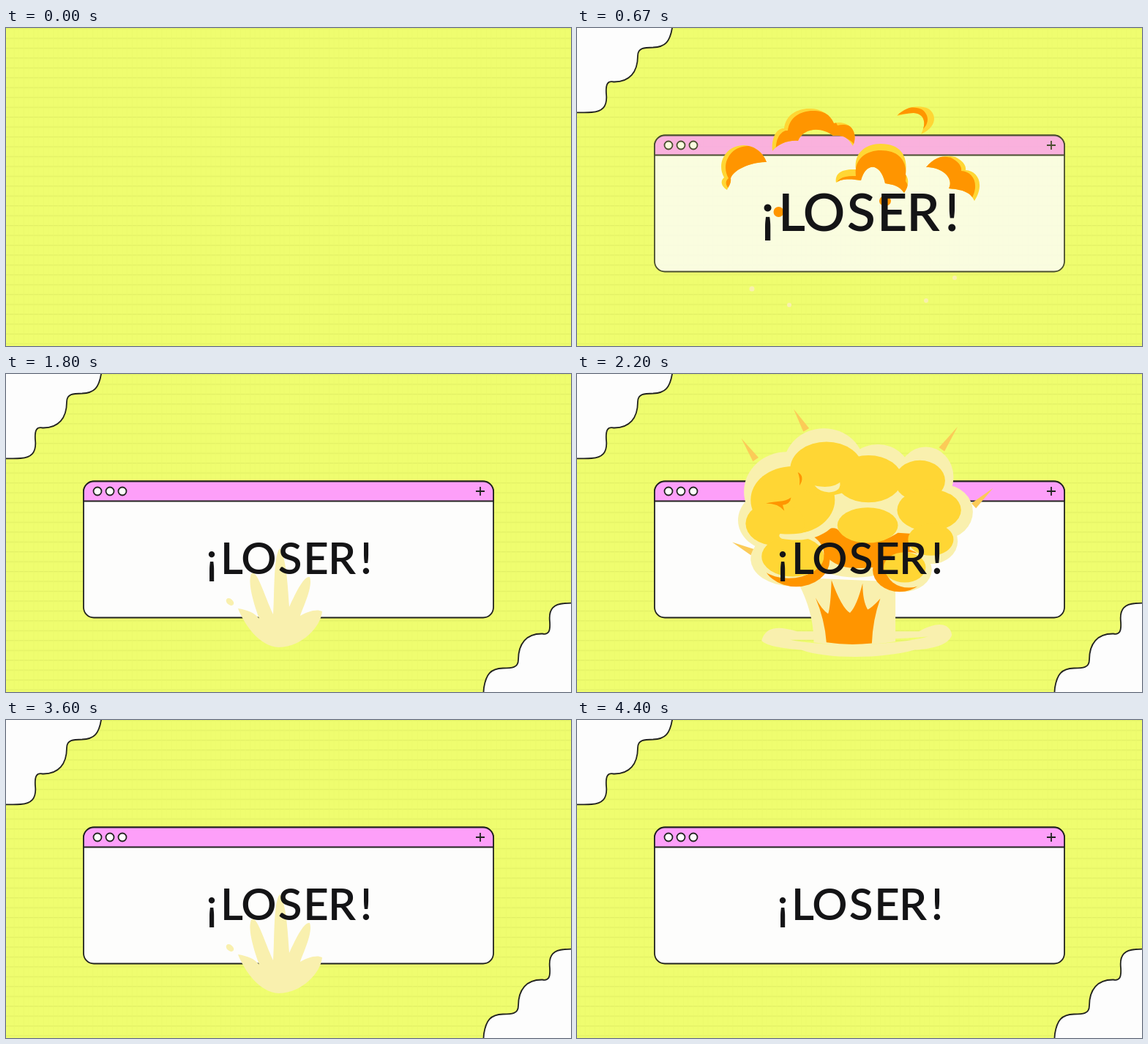
These frames come from a looping animation (772x434 px, 5410 ms). An HTML page:

```html
<!DOCTYPE html>
<html lang="es">
<head>
<meta charset="utf-8">
<title>¡LOSER!</title>
<style>
html, body { margin: 0; width: 100%; height: 100%; overflow: hidden; background: #effd6f; }
svg { display: block; width: 100%; height: 100%; }
.line { stroke: #222320; stroke-width: 1.8; }
.cream { fill: #f9f0ae; }
.yellow { fill: #ffd634; }
.orange { fill: #ff9500; }
.ray { fill: #fbcb58; }
.fat .puff { stroke: #ffd634; stroke-width: 9; stroke-linejoin: round; }
.tiny .puff { transform-box: fill-box; transform-origin: center; transform: scale(.42); }
text { font: 600 60px Lato, "Open Sans", sans-serif; text-anchor: middle; fill: #141416; }
</style>
</head>
<body>
<svg viewBox="0 0 772 434">
  <defs>
    <pattern id="paper" width="13.45" height="13.45" patternUnits="userSpaceOnUse">
      <rect width="14" height="14" fill="#effd6f"/>
      <path d="M0 .7H14" stroke="#dfed63" stroke-width="1"/>
      <path d="M4 0V14M11 0V14" stroke="#ebf96a" stroke-width=".6"/>
    </pattern>
    <path id="corner" d="M-14 -12H131L130 0C127 18 121 26 104 26.500C92 26.500 83 27 83 38C83 60 72 74 50 73.500C42 72 39 76 40 90C42 108 34 114 20 115C12 116 6 115 -14 115.500Z"/>
    <path id="splash" d="M317 320C330 322 340 326 346 334C338 312 330 285 335 273C342 264 352 300 365 328C367 300 365 250 374 238C383 250 385 290 387 318C395 300 407 275 415 277C420 290 405 320 402 330C412 324 425 320 432 324C430 345 405 372 373 373C345 372 325 340 317 320Z"/>
    <g id="mushroom"></g>
    <g id="puffs"></g>
  </defs>

  <rect width="772" height="434" fill="url(#paper)"/>
  <use id="topLeft" href="#corner" class="line" fill="#fdfdfd"/>
  <use id="bottomRight" href="#corner" class="line" fill="#fdfdfd" transform="rotate(180 391.5 214)"/>

  <g id="window" class="line" fill="#fdfdfc">
    <rect x="106" y="146.500" width="560" height="186" rx="14"/>
    <path d="M106 173.500V160.500a14 14 0 0 1 14 -14H652a14 14 0 0 1 14 14V173.500Z" fill="#fd9ff9"/>
    <circle cx="125" cy="160" r="5.500"/>
    <circle cx="142" cy="160" r="5.500"/>
    <circle cx="159" cy="160" r="5.500"/>
    <path d="M642 160H654M648 154V166"/>
  </g>

  <g id="blast">
    <g>
      <use href="#splash" class="cream"/>
      <ellipse cx="306" cy="311" rx="6" ry="4" class="cream" transform="rotate(40 306 311)"/>
    </g>
    <g>
      <use href="#splash" class="cream" transform="translate(373 373) scale(1.4 1.9) translate(-373 -373)"/>
      <use href="#splash" class="yellow" transform="translate(373 372) scale(.95 1.3) translate(-373 -373)"/>
      <use href="#splash" class="orange" transform="translate(373 371) scale(.55 .8) translate(-373 -373)"/>
    </g>
    <g>
      <use href="#splash" class="cream" transform="translate(373 373) scale(2 2.440) translate(-373 -373)"/>
      <use href="#mushroom" transform="translate(373 372) scale(.8) translate(-373 -372)"/>
    </g>
    <use href="#mushroom"/>
    <use href="#mushroom" transform="translate(373 372) scale(1.15) translate(-373 -372)"/>
    <g class="fat"><use href="#puffs" transform="translate(375 200) scale(1.05 1.15) translate(-375 -215)"/></g>
    <use href="#puffs"/>
    <g id="remains" class="tiny"></g>
  </g>

  <g id="title"><text x="281 308.500 345.500 388 423.500 459 492" y="273">¡LOSER!</text></g>
</svg>

<script>
const LOOP = 5410, BLAST_CYCLE = 1800, BLAST_STEP = 100;
const $ = id => document.getElementById(id);

const ellipses = (cls, list) => list.map(([x, y, rx, ry = rx]) =>
  `<ellipse class="${cls}" cx="${x}" cy="${y}" rx="${rx}" ry="${ry}"/>`).join('');
const shape = (cls, d) => `<path class="${cls}" fill-rule="evenodd" d="${d}"/>`;

// Tapered spike from a tip to the middle of its base
function ray(tipX, tipY, x, y) {
  const len = Math.hypot(x - tipX, y - tipY);
  const nx = (tipY - y) / len * 4, ny = (x - tipX) / len * 4;
  return shape('ray', `M${tipX} ${tipY}L${x + nx} ${y + ny}L${x - nx} ${y - ny}Z`);
}

$('mushroom').innerHTML =
  ray(306, 90, 321, 115) + ray(244, 125, 261, 150) + ray(501, 111, 482, 138) +
  ray(543, 184, 520, 205) + ray(233, 248, 257, 260) +
  shape('cream', 'M268 365C272 350 285 346 310 354H455C480 340 492 346 494 358C490 372 465 375 450 376C410 387 345 387 315 376C295 374 275 372 268 365ZM302 364C340 372 420 372 466 360C430 364 340 364 302 364Z') +
  shape('cream', 'M308 290C325 320 330 345 330 367C355 371 400 371 427 366V295Z') +
  ellipses('cream', [[342, 158, 48, 45], [406, 170, 40, 38], [463, 171, 33, 36], [485, 212, 34, 32],
    [469, 247, 32, 27], [436, 281, 34, 26], [298, 188, 51, 47], [282, 222, 42, 36],
    [303, 268, 48, 32], [380, 225, 85, 65]]) +
  shape('orange', 'M326 245C345 230 356 228 361 236C380 255 410 250 430 237L447 238L443 260C420 276 405 279 380 279C355 278 345 268 340 255Z') +
  ellipses('orange', [[309, 269, 40, 32], [432, 281, 32, 26]]) +
  ellipses('cream', [[300, 262, 42, 29], [443, 281, 27, 21]]) +
  ellipses('yellow', [[305, 198, 50, 40], [284, 226, 35, 26], [345, 161, 43, 32], [395, 173, 40, 28],
    [456, 175, 30, 24], [467, 210, 38, 25], [469, 245, 27, 19], [394, 228, 36, 21],
    [305, 265, 37, 24], [438, 278, 25, 18]]) +
  shape('cream', 'M290 238C325 241 350 230 356 206L361 218C348 242 320 249 292 244Q287 241 290 238Z') +
  shape('cream', 'M331 181C345 184 355 182 361 177Q363 188 348 189Q336 188 331 181Z') +
  shape('orange', 'M311 165Q320 170 313 181Q314 172 311 165Z') +
  shape('orange', 'M273 202C285 199 295 201 303 195Q302 203 293 204L295 211Q288 202 273 202Z') +
  shape('orange', 'M332 314Q343 340 345 367Q372 371 399 368Q400 340 409 315Q399 326 394 328Q388 318 388 297Q381 324 373 332Q363 326 351 293Q350 325 347 333Q340 329 332 314Z');

// Smoke crescents: outline, then the offset of the orange part
const crescents = [
  ['M267 168C265 145 276 136 283 137C285 118 302 109 320 110C338 111 348 122 351 130C370 125 386 140 377 161C370 150 365 146 350 147C335 135 310 135 302 154C288 153 275 158 267 168Z', 5, 3],
  ['M205 221C196 215 196 208 201 204C190 185 203 160 228 160C245 161 255 172 259 183C240 183 215 192 210 205C211 212 207 216 205 221Z', 6, 1],
  ['M437 120C450 106 468 105 480 110C492 118 492 135 470 145C478 130 475 117 460 116C450 116 445 119 437 120Z', -9, 1],
  ['M354 211C352 198 362 192 381 193C378 170 395 158 415 158C440 158 453 172 449 200C455 208 452 218 447 225C440 215 432 214 421 212C415 184 395 182 388 208C375 206 362 205 354 211Z', 0, 9],
  ['M477 190C490 174 505 173 517 176C528 182 532 188 531 194C547 195 558 212 543 236C538 225 530 221 508 219C515 205 500 190 477 190Z', -6, 1]
];
const smoke = crescents.map(([d, dx, dy], i) =>
  `<clipPath id="clip${i}"><path d="${d}"/></clipPath>
   <g class="puff"><path class="yellow" d="${d}"/>
   <g clip-path="url(#clip${i})" stroke="none"><path class="orange" d="${d}" transform="translate(${dx} ${dy})"/></g></g>`).join('');
$('puffs').innerHTML = smoke +
  ellipses('orange', [[275.5, 251, 7], [421, 236, 8, 7]]) +
  ellipses('cream', [[239, 356, 3.5], [290, 378, 3], [477, 372, 3], [516, 341, 3]]);
$('remains').innerHTML = smoke.replace(/clip(?=\d)/g, 'clipB');

const blastFrames = [...$('blast').children];
const progress = (t, from, to) => Math.min(1, Math.max(0, (t - from) / (to - from)));
const fade = (id, t, from, to) => $(id).setAttribute('opacity', progress(t, from, to));

function draw(t) {
  fade('topLeft', t, 15, 395);
  fade('blast', t, 118, 520);
  fade('window', t, 375, 745);
  fade('title', t, 500, 650);
  fade('bottomRight', t, 900, 1300);

  const step = t < 3 * BLAST_CYCLE ? Math.floor(t % BLAST_CYCLE / BLAST_STEP) : -1;
  blastFrames.forEach((el, i) => el.setAttribute('display', i === step ? 'inline' : 'none'));

  const scale = 1 + .5 * (1 - progress(t, 500, 1130)) ** 3;
  $('title').setAttribute('transform', `translate(386.5 252.4) scale(${scale}) translate(-386.5 -252.4)`);
}

const start = performance.now();
function tick() {
  draw((performance.now() - start) % LOOP);
  requestAnimationFrame(tick);
}
tick();
</script>
</body>
</html>
```
